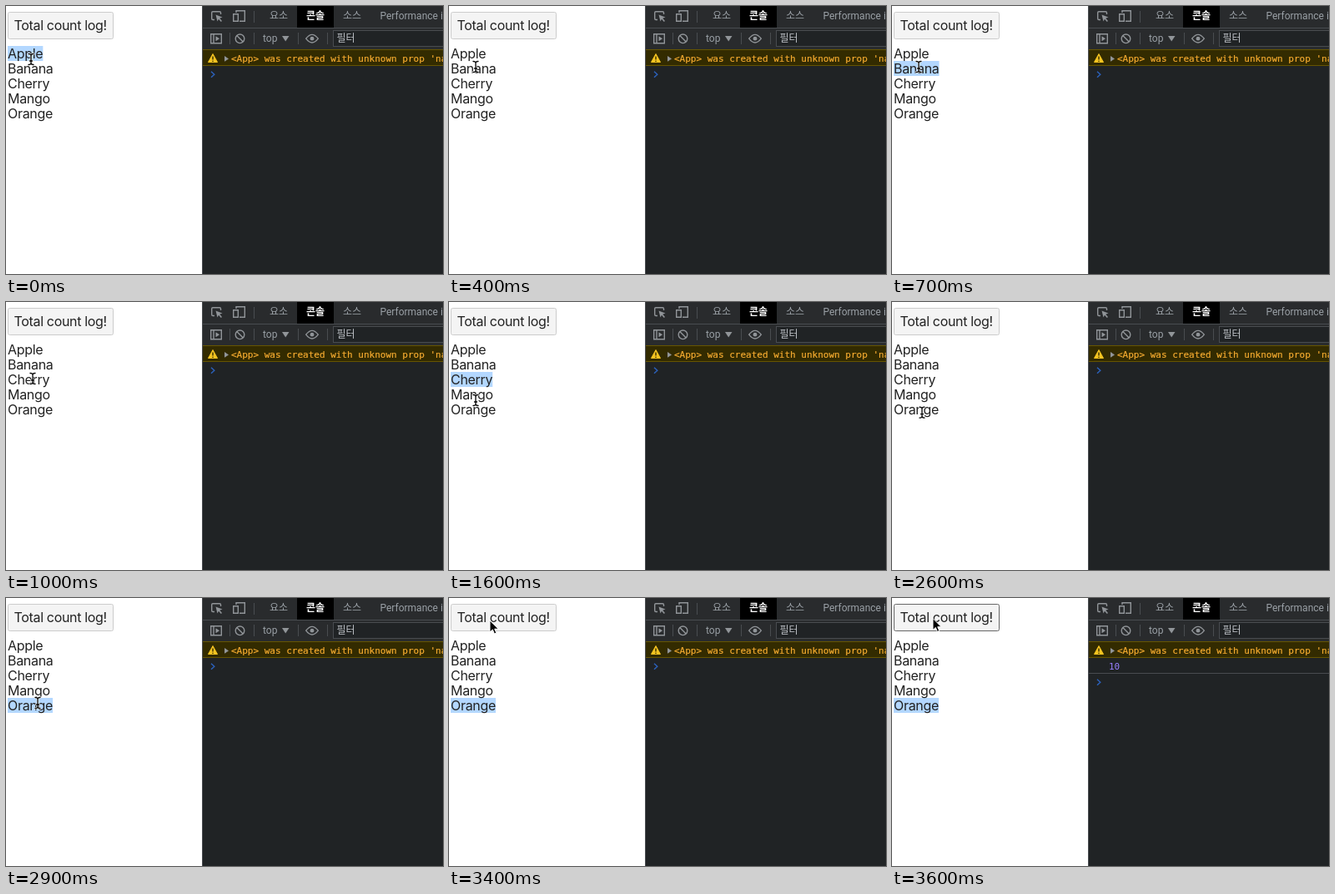
Recreate the animation shown at these times as an HTML page. Size 524x322 px, loop 3800 ms.

```html
<!DOCTYPE html>
<html lang="ko">
<head>
<meta charset="utf-8">
<title>Total count log</title>
<style>
html, body { margin: 0; width: 100%; height: 100%; overflow: hidden; background: #fff; }
svg { display: block; }
.page { font: 16px Inter, "Open Sans", sans-serif; letter-spacing: -.3px; fill: #222; }
.button-label { letter-spacing: -.33px; }
.ui { font: 12px Roboto, "Noto Sans CJK KR", "Noto Sans CJK", sans-serif; fill: #9aa0a6; }
.log { font: 11px "DejaVu Sans Mono", monospace; }
.icon { fill: none; stroke: #919599; stroke-width: 1.4; }
.rule { fill: none; stroke: #494c50; }
.chevron { fill: none; stroke: #2c62bd; stroke-width: 1.4; }
</style>
</head>
<body>
<svg width="524" height="322" viewBox="0 0 524 322">
  <rect width="524" height="322" fill="#fff"/>
  <g class="page">
    <rect id="button" x="2.5" y="7.5" width="126" height="32" rx="2" fill="#f4f4f4" stroke="#ccc"/>
    <text class="button-label" x="9.5" y="29">Total count log!</text>
    <rect id="mark" x="2" height="18" fill="#b3d7ff"/>
    <g id="list"></g>
  </g>

  <rect x="235" width="289" height="322" fill="#202325"/>
  <rect x="236" width="288" height="52" fill="#292b2d"/>
  <rect x="349" width="44" height="26" fill="#000"/>
  <path class="rule" d="M235.5 0V322M236 26.5H524M297.5 6V20M268.5 32V46M297.5 32V46M350.5 32V46M385.5 32V46"/>

  <g class="ui">
    <text x="316" y="16">요소</text>
    <text x="360" y="16" fill="#fff" font-weight="700">콘솔</text>
    <text x="404" y="16">소스</text>
    <text x="448.5" y="16">Performance insights</text>
    <text x="308" y="43">top</text>
    <path d="M331 36H339.5L335.2 42.5Z" fill="#919599"/>
    <rect x="392.5" y="29.5" width="140" height="19" fill="#202325" stroke="#494c50"/>
    <text x="396.5" y="43" fill="#bdc1c6">필터</text>
  </g>

  <g class="icon">
    <path d="M250 16.5H248Q246.7 16.5 246.7 15V8Q246.7 6.7 248 6.7H256Q257.5 6.7 257.5 8V10"/>
    <path d="M251.5 10.5L259.5 13.5L256.2 14.8L259 18L257.8 19L255 15.8L253.5 18.5Z" fill="#919599" stroke="none"/>
    <path d="M276 8V5.7H286.3V18.3H280M272.7 9.7H278.3V18.3H272.7Z"/>
    <path d="M245.7 33.7H258.3V44.8H245.7ZM249 34V45"/>
    <path d="M251.5 36.2L256 39.2L251.5 42.2Z" fill="#919599" stroke="none"/>
    <circle cx="280.5" cy="39.3" r="5.3"/>
    <path d="M276.8 35.6L284.2 43"/>
    <path d="M359.7 39.2Q367 29.5 374.3 39.2Q367 48.9 359.7 39.2Z"/>
    <circle cx="367" cy="39.2" r="2.4" fill="#919599" stroke="none"/>
  </g>

  <rect x="236" y="52" width="288" height="20" fill="#332b00"/>
  <path d="M236 52.5H524M236 71.5H524" stroke="#665500"/>
  <path d="M248 57.5L253.5 67.5H242.5Z" fill="#f5c421" stroke="#f5c421" stroke-linejoin="round"/>
  <path d="M248 60.5V64.5M248 65.7V67" stroke="#332b00" stroke-width="1.4"/>
  <path d="M262 60L267 63.4L262 66.8Z" fill="#919599"/>
  <text class="log" x="270" y="67" fill="#f5ab30" stroke="#f5ab30" stroke-width=".2">&lt;App&gt; was created with unknown prop 'name'</text>

  <g id="output">
    <text class="log" x="260" y="86" fill="#9980ff">10</text>
    <path class="rule" d="M236 90.5H524" stroke="#3a3d40"/>
  </g>
  <path id="prompt" class="chevron" d="M246 78.7L249.8 82.2L246 85.7"/>

  <defs>
    <path id="stem" d="M-3 -6.5Q0 -6.5 0 -4.5Q0 -6.5 3 -6.5M0 -4.5V4.5M-3 6.5Q0 6.5 0 4.5Q0 6.5 3 6.5M-1.5 2H1.5"/>
  </defs>
  <g id="cursor">
    <g id="beam" fill="none" stroke-linecap="round">
      <use href="#stem" stroke="#fff" stroke-width="2.6"/>
      <use href="#stem" stroke="#000" stroke-width="1.3"/>
    </g>
    <path id="arrow" d="M0 0V14L3.3 10.9L5.4 15.9L7.8 14.9L5.7 10.2H10.2Z" fill="#000" stroke="#fff"/>
  </g>
</svg>
<script>
const LOOP = 3800, STEP = 100, TOP = 48, ROW = 18;
const $ = id => document.getElementById(id);
const fruits = ['Apple', 'Banana', 'Cherry', 'Mango', 'Orange'];

// time, x, y of the pointer
const path = [
  [0, 30, 64], [200, 30, 64], [400, 32, 73], [700, 32, 73], [1000, 32, 92],
  [1300, 32, 92], [1600, 32, 118], [1900, 32, 118], [2200, 32, 145],
  [2400, 32, 146], [2700, 38, 126], [3000, 38, 126], [3400, 49, 27], [3600, 49, 24.5]
];
// start, end, row of each double-click selection
const picks = [[0, 300, 0], [500, 900, 1], [1100, 1700, 2], [1900, 2600, 3], [2800, LOOP, 4]];

const labels = fruits.map((name, i) => {
  const label = document.createElementNS('http://www.w3.org/2000/svg', 'text');
  label.textContent = name;
  label.setAttribute('x', 2);
  label.setAttribute('y', TOP + i * ROW + 15);
  $('list').append(label);
  return label;
});

function pointer(t) {
  const i = path.findIndex(p => p[0] > t);
  if (i < 0) return path[path.length - 1].slice(1);
  const [t0, x0, y0] = path[i - 1], [t1, x1, y1] = path[i];
  const k = (t - t0) / (t1 - t0);
  return [x0 + (x1 - x0) * k, y0 + (y1 - y0) * k];
}

function show(id, on) {
  $(id).setAttribute('visibility', on ? 'visible' : 'hidden');
}

function draw(t) {
  const [x, y] = pointer(t);
  const overText = y > TOP && y < TOP + ROW * fruits.length;
  $('cursor').setAttribute('transform', `translate(${x} ${y})`);
  show('beam', overText);
  show('arrow', !overText);

  const pick = picks.find(([from, to]) => t >= from && t < to);
  show('mark', pick);
  if (pick) {
    $('mark').setAttribute('y', TOP + pick[2] * ROW);
    $('mark').setAttribute('width', labels[pick[2]].getComputedTextLength());
  }

  const pressed = t >= 3500 && t < 3600, logged = t >= 3600;
  $('button').setAttribute('fill', pressed ? '#ddd' : '#f4f4f4');
  $('button').setAttribute('stroke', pressed || logged ? '#666' : '#ccc');
  show('output', logged);
  $('prompt').setAttribute('transform', `translate(0 ${logged ? 19 : 0})`);
}

const start = performance.now();
function tick() {
  const t = (performance.now() - start) % LOOP;
  draw(Math.floor(t / STEP) * STEP);
  requestAnimationFrame(tick);
}
tick();
</script>
</body>
</html>
```
